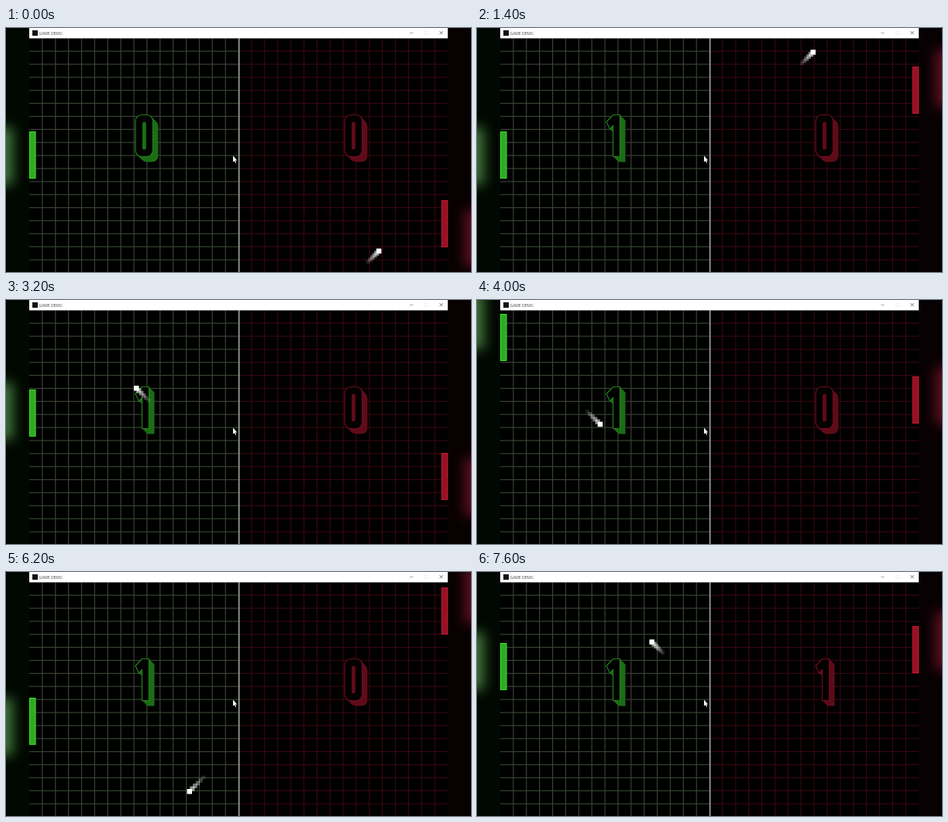
These frames come from a looping animation (600x316 px, 7700 ms). An HTML page with a canvas:

```html
<!DOCTYPE html>
<html lang="en">
<head>
<meta charset="utf-8">
<title>Paddle game</title>
<style>
html, body { margin: 0; width: 100%; height: 100%; overflow: hidden; background: #000; }
canvas { display: block; }
</style>
</head>
<body>
<canvas width="600" height="316"></canvas>
<script>
const ctx = document.querySelector('canvas').getContext('2d');
const LOOP = 7.7, STEP = .1, CELL = 16.88, GOALS = [.4, 6.8];

// tint: base hue, lit and soft: solid and faint parts at full flash
const GREEN = { tint: [62, 230, 46], grid: [54, 68, 50], glow: [64, 118, 58],
  side: [1, 8, 1], lit: [132, 250, 110], soft: [185, 248, 172] };
const RED = { tint: [200, 24, 50], grid: [54, 7, 16], glow: [98, 16, 34],
  side: [8, 1, 2], lit: [225, 95, 130], soft: [226, 155, 172] };
const BLACK = [0, 0, 0], WHITE = [255, 252, 255], HAZE = [240, 240, 240];

// Each move: [start, end, target y]
const greenMoves = [[3.05, 3.65, 18], [4, 4.75, 256], [5.65, 6.4, 143], [7.2, 7.6, 92]];
const redMoves = [[0, .5, 139], [.9, 1.35, 50], [1.6, 1.85, 95], [2.6, 3.2, 198],
  [3.3, 4, 99], [4.8, 5.2, 20], [7.2, 7.6, 70]];

const rallies = [
  { start: -.08, x: 460, y: 310, dir: 1 },
  { start: .9, x: 300, y: 165, dir: 1 },
  { start: 7.32, x: 300, y: 165, dir: -1 }
];

const clamp = v => Math.min(1, Math.max(0, v));
const ease = p => p * p * (3 - 2 * p);
const mix = (a, b, p) => `rgb(${a.map((v, i) => Math.round(v + (b[i] - v) * p))})`;
const shade = (color, level) => color.map(v => v * level);
const goalsBy = t => GOALS.filter(g => t >= g).length;

function paddleY(y, moves, t) {
  for (const [from, to, target] of moves) y += (target - y) * ease(clamp((t - from) / (to - from)));
  return y;
}

// Reflects v between two walls.
function bounce(v, low, high) {
  const span = high - low, m = (((v - low) % (2 * span)) + 2 * span) % (2 * span);
  return low + (m < span ? m : 2 * span - m);
}

// The ball flies diagonally and slowly speeds up during a rally.
function ball({ start, x, y, dir }, t) {
  const s = Math.max(0, t - start), d = 263.5 * s + 7.5 * s * s;
  return [bounce(x + dir * d, 42, 557), bounce(y - d, 16, 313.5)];
}

function flash(t) {
  const goals = goalsBy(t);
  return goals ? clamp(.9 - 2.25 * (t - GOALS[goals - 1])) : 0;
}

function rect(color, x, y, w, h) {
  ctx.fillStyle = color;
  ctx.fillRect(x, y, w, h);
}

function rounded(x, y, w, h, r) {
  const p = new Path2D();
  p.roundRect(x, y, w, h, r);
  return p;
}

const zero = rounded(167, 112.5, 22.5, 54, 8);
const slot = rounded(175.9, 121.5, 5, 36, 2.5);
const one = new Path2D('M167 121.5L175.5 112.5H184.5V166.5H175.5V126.5L171.5 131Z');
const arrow = new Path2D('M293 165.5v8l1.7-1.5 1.3 2.8 1-.5-1.2-2.7 2.2-.2Z');

function score(digit, x, side, f) {
  const body = digit ? one : zero, deep = mix(shade(side.tint, .47), side.soft, f);
  ctx.save();
  ctx.translate(x, 0);
  ctx.fillStyle = deep;
  for (let i = 0; i < 14; i++) {
    ctx.translate(.5, .5);
    ctx.fill(body);
  }
  ctx.translate(-7, -7);
  ctx.fillStyle = mix(BLACK, WHITE, f);
  ctx.fill(body);
  ctx.strokeStyle = mix(shade(side.tint, .56), side.soft, f);
  ctx.lineWidth = 1.2;
  ctx.stroke(body);
  if (!digit) {
    ctx.fillStyle = deep;
    ctx.fill(slot);
  }
  ctx.restore();
}

function glow(x, y, side, f) {
  ctx.save();
  ctx.filter = 'blur(8px)';
  rect(mix(side.glow, side.soft, f), x, 158 + (y + 30.5 - 158) * 1.2 - 37, 36, 74);
  ctx.restore();
}

function grid(first, side, f) {
  const color = mix(side.grid, HAZE, f);
  for (let k = 1; k < 18; k++) {
    if (k < 16) rect(color, first + k * CELL - .6, 13, 1.2, 303);
    rect(color, first, 12.6 + k * CELL, 270, 1.2);
  }
}

function paddle(x, y, side, f) {
  rect(mix(side.tint, side.lit, f), x, y, 8.5, 61);
  rect(mix(shade(side.tint, .74), side.lit, f), x + 1, y + 1, 6.5, 59);
}

function titleBar() {
  rect('#fff', 30, 0, 540, 13.4);
  rect('#111', 34, 3, 7, 7);
  ctx.fillStyle = '#444';
  ctx.font = '5px "Open Sans", sans-serif';
  ctx.fillText('GAME DEMO', 42.5, 8.5);
  rect('#999', 521, 6, 4.5, .8);
  ctx.lineWidth = .8;
  ctx.strokeStyle = '#eee';
  ctx.strokeRect(540.5, 4.5, 4, 4);
  ctx.strokeStyle = '#555';
  ctx.stroke(new Path2D('M559.5 4.2l4 4m0-4l-4 4'));
}

function cursor() {
  ctx.lineWidth = .7;
  ctx.strokeStyle = '#333';
  ctx.stroke(arrow);
  ctx.fillStyle = '#fff';
  ctx.fill(arrow);
}

function draw(t) {
  const f = flash(t), goals = goalsBy(t);
  const sides = [
    { side: GREEN, y: paddleY(134, greenMoves, t), x: 30, edge: 0, glowX: -27, paddleX: 30, points: goals > 0 },
    { side: RED, y: paddleY(223, redMoves, t), x: 300, edge: 570, glowX: 592, paddleX: 561.7, points: goals > 1 }
  ];

  for (const { side, y, edge, glowX } of sides) {
    rect(mix(side.side, WHITE, f), edge, 0, 30, 316);
    glow(glowX, y, side, f);
  }
  rect(mix(BLACK, WHITE, f), 30, 0, 540, 316);
  for (const { side, y, x, paddleX, points } of sides) {
    grid(x, side, f);
    score(points, x - 30, side, f);
    paddle(paddleX, y, side, f);
  }
  rect(mix([190, 190, 190], HAZE, f), 300, 13, 1.3, 303);

  for (let k = 5; k >= 0; k--) {
    const [x, y] = ball(rallies[goals], t - k * .0105), size = 6.5 - k * .3;
    ctx.globalAlpha = k ? .68 - k * .11 : 1;
    rect('#fff', x - size / 2, y - size / 2, size, size);
  }
  titleBar();
  cursor();
}

const start = performance.now();
function frame() {
  const t = (performance.now() - start) / 1000 % LOOP;
  draw(Math.floor(t / STEP + 1e-6) * STEP);
  requestAnimationFrame(frame);
}
frame();
</script>
</body>
</html>
```
